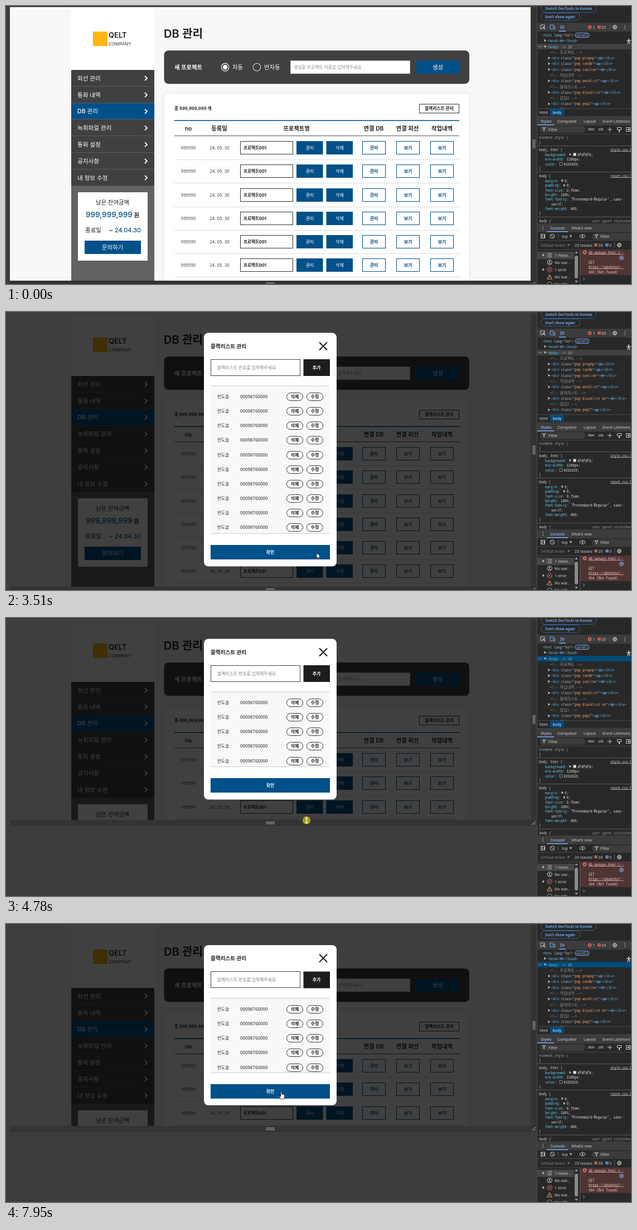
An HTML page with a canvas for the animation above (8 s loop, 1121 by 500 pixels).

```html
<!DOCTYPE html>
<html lang="ko">
<head>
<meta charset="utf-8">
<title>DB 관리</title>
<style>
html, body { margin: 0; width: 100%; height: 100%; overflow: hidden; background: #3c3c3c; }
canvas { display: block; }
</style>
</head>
<body>
<canvas id="stage" width="1121" height="500"></canvas>
<script>
const ctx = document.getElementById('stage').getContext('2d');
const LOOP = 8000;
const SANS = 'Inter, "Noto Sans CJK KR", sans-serif';
const CJK = '"Noto Sans CJK KR", "Noto Sans CJK", sans-serif';
const UI = 'Roboto, Arial, "Liberation Sans", sans-serif';
const MONO = '"Noto Sans Mono CJK KR", "Noto Sans Mono", monospace';
const BLUE = '#005089', INK = '#202020', GREY = '#c7c7c7', LINK = '#7cacf8', RED = '#e46962';
const PERSON = '반도솔', PHONE = '00098760000';

function text(s, x, y, size, color, { w = 500, a = 'left', f = SANS, it = '' } = {}) {
  ctx.font = `${it} ${w} ${size}px ${f}`;
  ctx.textAlign = a;
  ctx.fillStyle = color;
  ctx.fillText(s, x, y + size * 0.36);
  return ctx.measureText(s).width;
}
const mid = (s, x, y, size, color, w = 500, f = SANS) => text(s, x, y, size, color, { w, a: 'center', f });
const ui = (s, x, y, color = GREY, size = 7.3, w = 400) => text(s, x, y, size, color, { w, f: UI });
const mono = (s, x, y, color = GREY, it = '') => text(s, x, y, 7, color, { w: 400, f: MONO, it });

function rect(x, y, w, h, color) {
  ctx.fillStyle = color;
  ctx.fillRect(x, y, w, h);
}
function frame(x, y, w, h, color, fill) {
  if (fill) rect(x, y, w, h, fill);
  ctx.strokeStyle = color;
  ctx.lineWidth = 1;
  ctx.strokeRect(x + 0.5, y + 0.5, w - 1, h - 1);
}
function round(x, y, w, h, r, fill, stroke) {
  ctx.beginPath();
  ctx.roundRect(x, y, w, h, r);
  if (fill) { ctx.fillStyle = fill; ctx.fill(); }
  if (stroke) { ctx.strokeStyle = stroke; ctx.lineWidth = 1; ctx.stroke(); }
}
function trace(pts) {
  ctx.beginPath();
  for (let i = 0; i < pts.length; i += 2) ctx.lineTo(pts[i], pts[i + 1]);
}
function line(pts, color, w = 1) {
  trace(pts);
  ctx.strokeStyle = color;
  ctx.lineWidth = w;
  ctx.stroke();
}
function poly(pts, color) {
  trace(pts);
  ctx.fillStyle = color;
  ctx.fill();
}
function dot(x, y, r, color) {
  ctx.beginPath();
  ctx.arc(x, y, r, 0, 7);
  ctx.fillStyle = color;
  ctx.fill();
}
function ring(x, y, r, color, w = 1) {
  ctx.beginPath();
  ctx.arc(x, y, r, 0, 7);
  ctx.strokeStyle = color;
  ctx.lineWidth = w;
  ctx.stroke();
}
function clipped(x, y, w, h, draw) {
  ctx.save();
  ctx.beginPath();
  ctx.rect(x, y, w, h);
  ctx.clip();
  draw();
  ctx.restore();
}
const right = (x, y, c = GREY) => poly([x - 1.5, y - 2.5, x + 2, y, x - 1.5, y + 2.5], c);
const down = (x, y, c = GREY) => poly([x - 2.5, y - 1.5, x + 2.5, y - 1.5, x, y + 2], c);

// ---------- web page ----------
function sidebar() {
  rect(117, 2, 149, 113, '#fff');
  rect(156, 46, 26, 26, '#ffb60f');
  text('QELT', 184, 52, 13, INK, { w: 600 });
  text('COMPANY', 184, 68, 8, '#333', { w: 400 });
  rect(117, 115, 149, 209, '#404040');
  rect(117, 323.5, 149, 200, '#626262');
  ['회선 관리', '통화 내역', 'DB 관리', '녹취파일 관리', '통화 설정', '공지사항', '내 정보 수정'].forEach((s, i) => {
    const y = 115 + i * 29.8;
    if (i === 2) rect(117, y, 149, 29.8, BLUE);
    if (i) rect(117, Math.round(y) - 1, 149, 1, '#5c5c5c');
    text(s, 128, y + 15, 10.6, '#fff');
    line([249, y + 11, 253, y + 15, 249, y + 19], '#fff', 1.8);
  });
  rect(129, 335, 125, 123, '#fff');
  mid('남은 잔여금액', 191, 353, 10.4, INK);
  text('999,999,999', 143, 375, 13.5, BLUE);
  text('원', 229.5, 376, 10, INK, { w: 600 });
  text('종료일', 142, 403, 10.5, INK);
  text('~ 24.04.30', 242, 403, 10.9, BLUE, { a: 'right' });
  rect(141, 422, 101, 24, BLUE);
  mid('문의하기', 191, 434, 10.4, '#fff');
}

function form() {
  text('DB 관리', 283, 50, 20.2, INK, { w: 600 });
  round(283.5, 80, 547.5, 60, 8, '#404040');
  text('새 프로젝트', 302, 110, 10.3, '#fff', { w: 600 });
  ring(393, 110, 6.8, '#fff', 1.2);
  dot(393, 110, 4.3, '#fff');
  text('자동', 406, 110, 10.3, '#fff');
  ring(450, 110, 6.8, '#ddd', 1.1);
  text('반자동', 463, 110, 10.3, '#fff');
  frame(510, 98, 215, 24, '#ccc', '#fff');
  text('생성할 프로젝트 이름을 입력해주세요.', 516, 110, 7.8, '#8c8c8c', { w: 400 });
  rect(736, 98, 78, 24, BLUE);
  mid('생성', 774.5, 110, 10.3, '#fff');
}

function tableRow(y) {
  mid('999999', 327, y, 7.9, '#444', 300, CJK);
  mid('24. 05. 30', 383, y, 8.2, '#444', 300, CJK);
  frame(420, y - 12, 95, 24, '#333', '#fff');
  text('프로젝트001', 426, y, 7.5, INK, { w: 700 });
  [['관리', 521], ['삭제', 574.5]].forEach(([s, x]) => {
    rect(x, y - 12, 47.5, 24, BLUE);
    mid(s, x + 24, y, 8, '#fff');
  });
  [['관리', 639], ['보기', 700], ['보기', 761]].forEach(([s, x]) => {
    frame(x, y - 12, 42, 24, BLUE, '#fff');
    mid(s, x + 21, y, 8, BLUE, 600);
  });
  rect(302, y + 21, 511, 1, '#dcdcdc');
}

function table() {
  ctx.shadowColor = 'rgba(0,0,0,.1)';
  ctx.shadowBlur = 6;
  round(283.5, 157.5, 547.5, 400, 8, '#fff');
  ctx.shadowBlur = 0;
  text('총 999,999,999 개', 302, 184.5, 7.7, INK, { w: 600 });
  frame(741, 176, 72, 17, '#333', '#fff');
  mid('블랙리스트 관리', 777, 184.5, 7.7, INK, 600);
  rect(302, 205, 511, 2, '#3b77a5');
  rect(302, 233, 511, 1, '#555');
  [['no', 327], ['등록일', 382.5], ['프로젝트명', 521], ['연결 DB', 659.5], ['연결 회선', 720], ['작업내역', 782]]
    .forEach(([s, x]) => mid(s, x, 220, 10.3, INK, 600));
  for (let i = 0; i < 7; i++) tableRow(Math.round(255 + i * 42.25));
}

function popup(bottom, nudge) {
  const d = nudge / 2;
  rect(7, 2, 934, 500, 'rgba(0,0,0,.75)');
  round(355, 37.5 + d, 238, bottom - 74 - 2 * d, 8, '#fff');
  text('블랙리스트 관리', 367, 61.5, 9.6, INK, { w: 600 });
  line([562, 54.5, 576, 68.5], '#111', 1.8);
  line([576, 54.5, 562, 68.5], '#111', 1.8);
  frame(367, 85, 161, 30, '#444', '#fff');
  text('블랙리스트 번호를 입력해주세요.', 379, 100, 7.8, '#808080', { w: 400 });
  rect(533.5, 85 + d, 47.5, 30, '#1d1d1d');
  mid('추가', 557, 100, 8, '#fff', 600);
  clipped(367, 132, 214, bottom - 228, () => {
    rect(367, 132, 214, 400, '#f8f8f8');
    rect(367, 132.5 + d, 214, 1, '#cfcfcf');
    for (let i = 0; i < 11; i++) {
      const y = Math.floor(152.45 + i * 26.17) + nudge;
      text(PERSON, 379, y, 7.7, '#333', { w: 400 });
      text(PHONE, 420, y, 8.1, INK, { w: 500, f: CJK });
      [['삭제', 503], ['수정', 539]].forEach(([s, x]) => {
        round(x + 0.5, y - 6.5, 29, 14, 7, '#fff', '#333');
        mid(s, x + 15, y + 0.5, 8, INK, 600);
      });
    }
  });
  rect(367, bottom - 96, 214, 1, '#cfcfcf');
  rect(367, bottom - 75, 214, 26, BLUE);
  mid('확인', 474, bottom - 62, 7.8, '#fff', 600);
}

function resizers(bottom) {
  rect(941, 2, 12, bottom + 9, '#333');
  rect(7, bottom, 946, 11, '#333');
  for (const k of [0, 3]) {
    rect(466, bottom + 3.5 + k, 16, 1, '#bbb');
    rect(945 + k, bottom / 2 - 7, 1, 16, '#bbb');
  }
  line([943, bottom + 9, 950, bottom + 2], '#bbb');
  line([947, bottom + 9, 950, bottom + 6], '#bbb');
}

// ---------- developer tools ----------
const TAG = '#5db0d7', ATTR = '#9bbbdc', VAL = '#f29766', NOTE = '#8f8f8f';

function run(x, y, ...parts) {
  for (const [s, c] of parts) x += mono(s, x, y, c);
  return x;
}
function more(x, y) {
  round(x + 0.5, y - 2.5, 8, 6, 3, '#36506f');
  for (const k of [2.5, 4.5, 6.5]) dot(x + k, y + 0.5, 0.6, '#cfe0ff');
  return x + 9;
}
function node(x, y, name, cls) {
  right(x - 4, y);
  const parts = cls ? [[' class', ATTR], ['="', TAG], [cls, VAL], ['"', TAG]] : [];
  const end = more(run(x, y, ['<' + name, TAG], ...parts, ['>', TAG]), y);
  run(end, y, [`</${name}>`, TAG]);
}
function gear(x, y) {
  ring(x, y, 2.9, GREY, 1.2);
  dot(x, y, 1.2, GREY);
  for (let i = 0; i < 8; i++) {
    const a = i * Math.PI / 4;
    line([x + 3 * Math.cos(a), y + 3 * Math.sin(a), x + 4.3 * Math.cos(a), y + 4.3 * Math.sin(a)], GREY);
  }
}
const kebab = (x, y) => [-3, 0, 3].forEach(k => dot(x, y + k, 0.8, GREY));
const funnel = (x, y) => line([x - 3, y - 3, x + 3, y - 3, x, y, x, y + 3, x, y, x - 3, y - 3], GREY);
function cross(x, y, r, solid) {
  if (solid) dot(x, y, r, RED); else ring(x, y, r, RED);
  const k = r * 0.4, c = solid ? '#282828' : RED;
  line([x - k, y - k, x + k, y + k], c);
  line([x + k, y - k, x - k, y + k], c);
}
function badge(x, y, color) {
  round(x - 2.7, y - 2.7, 5.4, 5, 1, color);
  rect(x - 1.5, y - 1, 3, 1, '#282828');
}

function elements(open, focused) {
  round(959.5, -4, 99.5, 15.5, 8, null, '#2f6597');
  ui('Switch DevTools to Korean', 967, 4.5, LINK, 7.1, 500);
  round(959.5, 12.5, 70, 13.5, 7, null, '#2f6597');
  ui("Don't show again", 967, 19, LINK, 7.1, 500);
  rect(953, 30, 168, 16, '#3c3c3c');
  line([966, 40, 966, 34, 959, 34, 959, 41, 962, 41], GREY);
  line([967, 42, 963, 38], GREY, 1.3);
  line([963, 41, 963, 38, 966, 38], GREY);
  line([983, 34, 976, 34, 976, 41, 980, 41], LINK);
  frame(981, 36, 4, 6, LINK);
  line([994, 35, 997, 38, 994, 41], LINK, 1.1);
  line([998, 35, 1001, 38, 998, 41], LINK, 1.1);
  rect(992, 44.5, 12, 1.5, LINK);
  cross(1047, 38, 3.2, true);
  ui('1', 1052, 38);
  badge(1064, 38, RED);
  ui('20', 1068, 38);
  rect(1083, 33, 1, 10, '#5e5e5e');
  gear(1092, 38);
  kebab(1110, 38);

  clipped(953, 46, 168, 138, () => {
    let x = run(962, 52, ['<html ', TAG], ['lang', ATTR], ['="', TAG], ['ko', VAL], ['">', TAG]);
    round(x + 3, 48.5, 25, 8, 4, null, LINK);
    mono('scroll', x + 5, 52.5, '#a8c7fa');
    node(971, 62, 'head');
    rect(953, 68, 168, 10, focused ? '#004a77' : '#404040');
    for (const k of [0, 2, 4]) dot(956 + k, 73, 0.7, GREY);
    down(967, 73);
    x = run(971, 73, ['<body>', TAG]);
    mono('== $0', x + 5, 73, '#a5a5a5', 'italic');
    const tree = ['#프로젝트', 'propop', 'condb', 'conline', '#작업내역', 'worklist', '#블랙리스트',
      open ? 'blacklist on' : 'blacklist', '#팝업2', 'pop2', '#팝업1'];
    tree.forEach((s, i) => {
      const y = 83.2 + i * 10.3;
      if (s[0] === '#') mono(`<!-- ${s.slice(1)} -->`, 976, y, NOTE);
      else node(978, y, 'div', 'pop ' + s);
    });
  });
  dot(1117, 59.5, 1.1, '#ddd');
  line([1113, 62, 1121, 62], '#ddd', 1.2);
  line([1115, 68, 1117, 62, 1119, 68], '#ddd', 1.2);
  rect(953, 184, 168, 1, '#474747');
  rect(976, 185, 25, 12, '#004a77');
  ui('html', 957, 191);
  ui('body', 980.5, 191, '#d5e5ff');
}

function rule(y, sel, src) {
  rect(953, y - 7, 168, 1, '#5a5a5a');
  mono(sel + ' {', 956, y);
  const w = mono(src, 1084, y);
  rect(1084, y + 3, w, 0.7, GREY);
}
function prop(y, name, value, swatch, fold) {
  let x = run(967, y, [name, '#5cc8ee'], [': ', GREY]);
  if (fold) { right(x + 3, y); x += 7; }
  if (swatch) { frame(x + 1, y - 3, 6, 6, '#888', swatch); x += 9; }
  mono(value + ';', x, y, '#ddd');
}

function styles() {
  rect(953, 198, 168, 17, '#3c3c3c');
  ui('Styles', 959, 207, '#a8c7fa');
  rect(953, 213, 30, 1.5, LINK);
  [['Computed', 989], ['Layout', 1036], ['Event Listeners', 1070]].forEach(([s, x]) => ui(s, x, 207));
  round(957, 216, 82, 12, 6, '#3c3c3c');
  funnel(965, 222);
  ui('Filter', 973, 222.5);
  ui(':hov', 1043, 222, GREY, 6.5, 500);
  ui('.cls', 1061, 222, GREY, 6.5, 500);
  line([1079, 222, 1087, 222], GREY);
  line([1083, 218, 1083, 226], GREY);
  frame(1096, 218, 8, 5, GREY);
  rect(1099, 223, 2, 4, GREY);
  frame(1112, 218, 8, 8, GREY);
  poly([1118, 219.5, 1114, 222, 1118, 224.5], GREY);
  rect(953, 230, 168, 1, '#474747');
  clipped(953, 231, 168, 160, () => {
    mono('element.style {', 956, 236, '#a0a0a0');
    mono('}', 956, 245);
    rule(258, 'body, html', 'style.css:1');
    prop(267, 'background', '#F8F8F8', '#f8f8f8', true);
    prop(275.5, 'min-width', '1200px');
    prop(284, 'color', '#202020', '#202020');
    mono('}', 956, 292);
    rule(305, 'body', 'reset.css:1');
    prop(314, 'margin', '0', null, true);
    prop(322.5, 'padding', '0', null, true);
    prop(331, 'font-size', '0.75em');
    prop(339, 'height', '100%');
    run(967, 347.5, ['font-family', '#5cc8ee'], [": 'Pretendard-Regular', sans-", '#ddd']);
    mono('serif;', 978, 356, '#ddd');
    prop(364, 'font-weight', '400');
    mono('}', 956, 372);
    rect(953, 379, 168, 1, '#5a5a5a');
    mono('body {', 956, 386, GREY, 'italic');
    mono('user agent stylesheet', 1051, 386, NOTE, 'italic');
  });
}

function consoleDrawer() {
  rect(953, 391, 168, 16, '#3c3c3c');
  kebab(963, 399);
  ui('Console', 976, 399, '#a8c7fa');
  rect(970, 405, 38, 1.5, LINK);
  ui("What's new", 1014, 399);
  frame(959, 410, 8, 8, GREY);
  rect(961, 410, 1, 8, GREY);
  poly([966, 412, 963, 414, 966, 416], GREY);
  ring(980, 414, 3.8, GREY);
  line([977.5, 411.5, 982.5, 416.5], GREY);
  rect(990, 410, 1, 9, '#5e5e5e');
  ui('top', 997, 414);
  down(1013, 414);
  ctx.beginPath();
  ctx.ellipse(1034, 414, 4.8, 3, 0, 0, 7);
  ctx.strokeStyle = GREY;
  ctx.stroke();
  dot(1034, 414, 1.4, GREY);
  round(1051, 408.5, 80, 12, 6, '#3c3c3c');
  funnel(1059, 414.5);
  ui('Filter', 1066, 414.5);
  rect(953, 421, 168, 1, '#474747');
  ui('Default levels', 959, 430, '#7d7d7d');
  down(1009, 430, '#7d7d7d');
  ui('23 Issues:', 1020, 430);
  badge(1058, 430, RED);
  ui('20', 1062.5, 430);
  badge(1078, 430, '#6d9eeb');
  ui('3', 1082, 430);
  rect(1091, 425, 1, 10, '#5e5e5e');
  gear(1100, 430);
  rect(953, 438, 168, 1, '#474747');

  rect(953, 442, 66, 13, '#454545');
  right(964, 448);
  right(964, 474);
  for (const k of [-3, 0, 3]) {
    rect(970, 447.5 + k, 1.3, 1, GREY);
    rect(972.5, 447.5 + k, 6.5, 1, GREY);
  }
  ring(975, 461, 4.2, GREY);
  dot(975, 459.8, 1.4, GREY);
  line([972, 464, 975, 462.5, 978, 464], GREY);
  cross(975, 474, 4.2, false);
  line([970.5, 491, 975, 483, 979.5, 491, 970.5, 491], '#f0a05a');
  rect(974.5, 486, 1, 3, '#f0a05a');
  ring(975, 500.5, 4.2, LINK);
  ['1 mess...', 'No use...', '1 error', 'No war...', 'No info'].forEach((s, i) => ui(s, 984, 448 + i * 13.1));
  poly([1020, 445, 1023, 441, 1026, 445], '#999');
  round(1020, 449, 6, 41, 3, '#8a8a8a');
  poly([1020, 494, 1023, 498, 1026, 494], '#999');
  rect(1029, 439, 1, 61, '#5a5a5a');

  const pink = '#f2b8b5';
  rect(1030, 438, 91, 46, '#4e3534');
  cross(1038, 443, 3.4, true);
  let w = mono('db_manage.html:1⋯', 1045, 443, pink);
  rect(1045, 446.2, w, 0.7, pink);
  ring(1104, 453, 3.5, LINK);
  line([1101, 453, 1107, 453], LINK);
  line([1104, 450, 1104, 456], LINK);
  mono('GET', 1045, 461, pink);
  w = mono('https://qkekths7⋯', 1045, 469, pink);
  rect(1045, 472.2, w, 0.7, pink);
  mono('404 (Not Found)', 1045, 478, pink);
  line([1035.5, 488.5, 1037.5, 491, 1035.5, 493.5], LINK);
}

// ---------- motion ----------
// time, x, y
const pathKeys = [
  [70, 948, 499], [250, 800, 350], [430, 628, 205], [560, 690, 70], [760, 745, 107],
  [890, 745, 107], [960, 753, 111], [1360, 753, 111], [1500, 762, 165], [1850, 760, 181],
  [2740, 760, 181], [2880, 662, 200], [3020, 660, 205], [3650, 528, 498], [3940, 528, 498],
  [4220, 530, 454], [4710, 539, 364], [4990, 539, 364], [5060, 541, 368], [5520, 473, 191],
  [7330, 473, 191], [7400, 464, 197], [7600, 464, 197], [7950, 493, 301]
];
// time, page bottom, half-pixel rounding of the centred popup
const edgeKeys = [[3940, 494, 0], [4010, 490, 1], [4220, 459, 1], [4710, 363, 0], [4920, 363, 0], [4990, 363, 1]];

function at(keys, t) {
  if (t <= keys[0][0]) return keys[0].slice(1);
  const i = keys.findIndex(k => k[0] > t);
  if (i < 0) return keys[keys.length - 1].slice(1);
  const a = keys[i - 1], b = keys[i], u = (t - a[0]) / (b[0] - a[0]);
  return a.slice(1).map((v, j) => v + (b[j + 1] - v) * u);
}

function shape(pts, x, y) {
  const p = pts.map((v, i) => v + (i % 2 ? y : x));
  poly(p, '#fff');
  ctx.closePath();
  ctx.strokeStyle = '#222';
  ctx.lineWidth = 0.8;
  ctx.stroke();
}
function cursor(t) {
  if (t < 70) return;
  const [x, y] = at(pathKeys, t);
  if (t >= 3580 && t < 4990) {
    if (t >= 3940) dot(x, y, 7.2, '#a3a012');
    rect(x - 0.6, y - 4, 1.2, 8, '#fff');
    poly([x - 2.5, y - 3, x, y - 6, x + 2.5, y - 3], '#fff');
    poly([x - 2.5, y + 3, x, y + 6, x + 2.5, y + 3], '#fff');
  } else if (t >= 7880) {
    shape([0, 0, 1.6, 0, 1.8, 5, 6, 6, 6.6, 7.5, 6, 12, 5, 14, 0, 14, -3, 9, -2.6, 8, -0.2, 9.5], x, y);
  } else {
    shape([0, 0, 0, 9.8, 2.2, 7.8, 3.8, 11.4, 5.3, 10.7, 3.7, 7.3, 6.8, 7], x, y);
  }
}

function draw(t) {
  const [bottom, nudge] = at(edgeKeys, t).map(Math.round);
  rect(0, 0, 1121, 500, '#3c3c3c');
  clipped(7, 2, 934, bottom - 2, () => {
    rect(7, 2, 934, 498, '#f8f8f8');
    sidebar();
    form();
    table();
    if (t >= 2180) popup(bottom, nudge);
  });
  resizers(bottom);
  rect(953, 0, 168, 500, '#282828');
  elements(t >= 2320, t >= 3940);
  styles();
  consoleDrawer();
  rect(952, 0, 1, 500, '#4a4a4a');
  cursor(t);
}

const start = performance.now();
function tick() {
  draw((performance.now() - start) % LOOP);
  requestAnimationFrame(tick);
}
tick();
</script>
</body>
</html>
```
